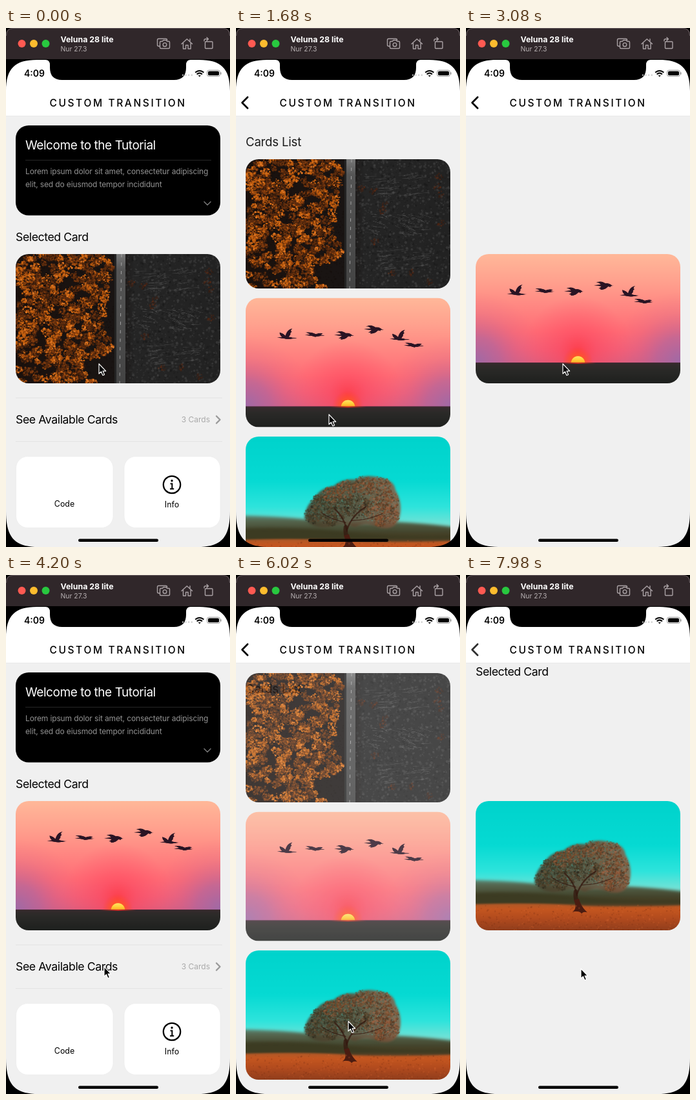
Animation, 347 px wide and 799 px high, one loop 8 s. Source, as an HTML page with a canvas:

```html
<!DOCTYPE html>
<html lang="en">
<head>
<meta charset="utf-8">
<title>Card transition</title>
<style>
  html, body { margin: 0; width: 100%; height: 100%; overflow: hidden; background: #000; }
  #stage { position: absolute; left: 0; top: 0; width: 347px; height: 799px; overflow: hidden; background: #f0f0f0; }
  #stage > * { position: absolute; left: 0; top: 0; }
  canvas { left: 15px !important; width: 317px; height: 198.5px; border-radius: 20px; }
  text { font-family: Inter, "Liberation Sans", sans-serif; }
  .h { font-size: 17.7px; letter-spacing: -.42px; }
  .line { fill: none; stroke-linecap: round; stroke-linejoin: round; }
</style>
</head>
<body>
<div id="stage">
  <svg width="347" height="799">
    <text id="listTitle" x="15" y="182" font-size="18.6" letter-spacing="-.2" fill="#1c1c1c">Cards List</text>
    <g id="top">
      <rect x="15" y="150" width="317" height="138.500" rx="20"/>
      <text x="30" y="187" font-size="19" letter-spacing="-.45" fill="#fff">Welcome to the Tutorial</text>
      <path d="M30 203.500H318" stroke="#262626"/>
      <g font-size="12" letter-spacing="-.13" fill="#929292">
        <text x="30" y="225">Lorem ipsum dolor sit amet, consectetur adipiscing</text>
        <text x="30" y="244.500">elit, sed do eiusmod tempor incididunt</text>
      </g>
      <path class="line" d="M307 267.500l5 5 5-5" stroke="#777" stroke-width="1.500"/>
      <text class="h" x="15" y="328">Selected Card</text>
    </g>
    <g id="bottom">
      <path d="M15 569.500H335M15 636.500H335" stroke="#e3e3e3"/>
      <text class="h" x="15" y="609">See Available Cards</text>
      <text x="316" y="607" font-size="12" text-anchor="end" fill="#aaa">3 Cards</text>
      <path class="line" d="M326 597.500l5.500 5.500-5.500 5.500" stroke="#999" stroke-width="2.300"/>
      <g fill="#fff" stroke="#ebebeb" stroke-width=".7">
        <rect x="15.500" y="659.500" width="150.500" height="110" rx="18"/>
        <rect x="183" y="659.500" width="149" height="110" rx="18"/>
      </g>
      <g font-size="12.400" text-anchor="middle">
        <text x="90.500" y="736.500">Code</text>
        <text x="257" y="737.500">Info</text>
      </g>
      <circle cx="257" cy="703" r="13.200" fill="none" stroke="#000" stroke-width="2.300"/>
      <circle cx="257" cy="697" r="1.700"/>
      <path d="M254.500 701.500h2.800v8M254 709.500h6.200" fill="none" stroke="#000" stroke-width="2"/>
    </g>
  </svg>

  <canvas width="634" height="397"></canvas>
  <canvas width="634" height="397"></canvas>
  <canvas width="634" height="397"></canvas>

  <svg width="347" height="799">
    <rect y="47" width="347" height="88" fill="#fff"/>
    <path d="M0 135.500H347" stroke="#e9e9e9"/>
    <text x="67.500" y="120.500" font-size="15.500" font-weight="500" letter-spacing="2.620">CUSTOM TRANSITION</text>
    <path id="back" class="line" d="M18 106.500l-8.500 8.500 8.500 8.500" stroke="#000" stroke-width="2.700"/>

    <path fill-rule="evenodd" d="M0 46H347V799H0ZM0 97C0 62 14 49 48 49H61q7 0 7 8v4q0 19 19 19H260q19 0 19-19v-4q0-8 7-8H299C333 49 347 62 347 97V744C347 784 334 799 297 799H50C13 799 0 784 0 744Z"/>
    <text x="28" y="74.500" font-size="14" font-weight="600">4:09</text>
    <path d="M273 72.500H289" stroke="#c4c4c4" stroke-width="2" stroke-dasharray="2 2.600"/>
    <g fill="none" stroke="#000" stroke-width="2">
      <path d="M293.200 68.600q6.600-5.800 13.200 0M295.600 71.200q4.200-3.600 8.400 0"/>
      <path d="M297.600 72.800h4.400l-2.200 2.400z" fill="#000" stroke="none"/>
    </g>
    <rect x="311.500" y="65" width="20" height="9.500" rx="3" fill="none" stroke="#999"/>
    <rect x="313" y="66.500" width="17" height="6.500" rx="1.800"/>
    <path d="M333 68.200v3.200" stroke="#999" stroke-width="1.400"/>
    <rect x="112" y="786.500" width="124" height="4.500" rx="2.250"/>

    <rect width="347" height="48"/>
    <path d="M0 48V10Q0 0 10 0H337Q347 0 347 10V48Z" fill="#30272a"/>
    <path d="M.5 12Q.5 .5 11 .5H336Q346.500 .5 346.500 12" fill="none" stroke="#695f62"/>
    <circle cx="24.500" cy="24" r="6" fill="#ff5a52"/>
    <circle cx="43" cy="24" r="6" fill="#fdbc2e"/>
    <circle cx="61.500" cy="24" r="6" fill="#28c83f"/>
    <text x="84.500" y="22" font-size="12.400" font-weight="700" fill="#fff">Veluna 28 lite</text>
    <text x="84.500" y="35.500" font-size="10.400" fill="#b7b0b2">Nur 27.3</text>
    <g class="line" stroke="#a9a1a4" stroke-width="1.400">
      <path d="M238 28h-1.500q-2 0-2-2v-7.500q0-2 2-2h11q2 0 2 2"/>
      <path d="M240 20.500h2.500l1.200-1.700h4.600l1.200 1.700h2.500q1.500 0 1.500 1.500v8q0 1.500-1.500 1.500h-12q-1.500 0-1.500-1.500v-8q0-1.500 1.500-1.500z"/>
      <circle cx="246" cy="25.700" r="2.800"/>
      <path d="M272 24.500l8.300-7.500 8.300 7.500M274.500 23v9h4v-5.500h3.600v5.500h4v-9M285 20v-3"/>
      <path d="M309.500 21h9.500q1 0 1 1v8.500q0 1-1 1h-9.500q-1 0-1-1v-8.500q0-1 1-1zM307 20v-1q0-2 2-2h4M311 14.500l2.500 2.500-2.500 2.500"/>
    </g>
    <path id="cursor" d="M0 0V15.200L3.400 12L5.900 17.700L8.500 16.600L6 11.100H10.700Z" stroke="#fff" stroke-width="1.200" stroke-linejoin="round"/>
  </svg>
</div>

<script>
const LOOP = 8000, DUR = 468;
const CARD_Y = [202, 415.5, 629], HOME_Y = 348;
const TOP_SHIFT = 330, BOTTOM_SHIFT = 480;

// [start, opens the list?, selected card]
const MOVES = [[640, true, 0], [2600, false, 1], [4388, true, 1], [5880, false, 2], [7741, true, 2]];
// [time, x, y] of the pointer tip
const POINTER = [[0, 144, 517], [150, 144, 517], [560, 144, 595], [1850, 144, 595], [2400, 150, 517],
  [3450, 150, 517], [4200, 152, 603], [4700, 152, 603], [5050, 152, 597], [5300, 152, 597],
  [5800, 174, 687], [6950, 174, 687], [7550, 178, 606], [8000, 178, 606]];

const $ = id => document.getElementById(id);
const cards = [...document.querySelectorAll('canvas')];
const clamp = v => Math.max(0, Math.min(1, v));
const ease = t => t < .5 ? 2 * t * t : 1 - 2 * (1 - t) ** 2;

function random(seed) {
  return () => {
    seed = seed + 0x6D2B79F5 | 0;
    let n = Math.imul(seed ^ seed >>> 15, seed | 1);
    n ^= n + Math.imul(n ^ n >>> 7, n | 61);
    return ((n ^ n >>> 14) >>> 0) / 4294967296;
  };
}

function context(i) {
  const c = cards[i].getContext('2d');
  c.scale(2, 2);
  return c;
}

function fade(c, coords, stops) {
  const g = coords.length > 4 ? c.createRadialGradient(...coords) : c.createLinearGradient(...coords);
  stops.forEach(([at, color]) => g.addColorStop(at, color));
  return g;
}

function dot(c, x, y, r, color) {
  c.fillStyle = color;
  c.beginPath();
  c.arc(x, y, r, 0, 7);
  c.fill();
}

// Scatter small dots around a point; later ones sit higher and catch more light.
function clump(c, rnd, x, y, size, count, colors) {
  for (let i = 0; i < count; i++) {
    const a = rnd() * 6.283, d = Math.sqrt(rnd()) * size;
    const shade = Math.min(colors.length - 1, Math.floor((i / count * .65 + rnd() * .4) * colors.length));
    dot(c, x + Math.cos(a) * d, y + Math.sin(a) * d * .85 - i / count * 2, .5 + rnd() * 1.3, colors[shade]);
  }
}

function drawForest() {
  const c = context(0), rnd = random(12);
  c.fillStyle = fade(c, [0, 0, 317, 0], [[0, '#1b110d'], [.5, '#191514'], [.58, '#252525'], [1, '#222']]);
  c.fillRect(0, 0, 317, 199);

  // Burnt field with tracks and a few reddish trees
  c.globalAlpha = .5;
  for (let i = 0; i < 1800; i++) {
    const v = 20 + rnd() * 55;
    dot(c, 170 + rnd() * 147, rnd() * 199, .5 + rnd() * 1.7, `rgb(${v},${v},${v})`);
  }
  c.lineWidth = .6;
  c.strokeStyle = '#858585';
  for (let i = 0; i < 120; i++) {
    const band = i % 3, x = 180 + rnd() * 85 + band * 8, y = 25 + band * 57 + rnd() * 32;
    c.globalAlpha = .12 + rnd() * .28;
    c.beginPath();
    c.moveTo(x, y);
    c.lineTo(x + 6 + rnd() * 14, y + (band === 1 ? 8 : -5) * rnd());
    c.stroke();
  }
  c.globalAlpha = .45;
  for (let i = 0; i < 12; i++) clump(c, rnd, 178 + rnd() * 125, rnd() * 195, 6, 16, ['#2b1810', '#4b2110', '#6a2f15']);

  // Road
  c.globalAlpha = 1;
  c.fillStyle = fade(c, [0, 0, 0, 199], [[0, '#777'], [.12, '#565656'], [1, '#444']]);
  c.fillRect(155, 0, 15, 199);
  c.fillStyle = '#242424';
  c.fillRect(153, 0, 3, 199);
  c.strokeStyle = '#aaa';
  c.lineWidth = .9;
  c.setLineDash([5, 8]);
  c.beginPath();
  c.moveTo(164, 0);
  c.lineTo(161, 199);
  c.stroke();

  // Autumn crowns from deep shade to lit tops
  const shade = ['#25140c', '#40200d', '#5d2c0e', '#7c390e'];
  const lit = ['#3a1d0c', '#71340d', '#a04a0e', '#c4600f', '#da7422'];
  for (let i = 0; i < 420; i++) {
    const x = rnd() * 148, y = rnd() * 199;
    if (x > 108 && y > 160 && y < 195 || x > 136 && y > 85 && y < 125) continue;
    const bright = rnd() < .48;
    clump(c, rnd, x, y, 4 + rnd() * 5, 32, bright ? lit : shade);
  }
  c.globalAlpha = .4;
  for (let i = 0; i < 1300; i++) dot(c, rnd() * 152, rnd() * 199, .4 + rnd() * 1.1, '#150d0a');
}

function drawBird(c, x, y, wing) {
  c.save();
  c.translate(x, y);
  c.fillStyle = '#2a1424';
  c.fill(new Path2D('M0 0Q8-1 13-1.500Q19-1.500 24 0L31 .8L23 1.700Q17 3.200 11 1.500Z'));
  c.fill(new Path2D(wing));
  c.restore();
}

function drawSunset() {
  const c = context(1), horizon = 166.5;
  c.fillStyle = fade(c, [0, 0, 0, horizon],
    [[0, '#ffb899'], [.25, '#ffa18e'], [.5, '#ff8581'], [.72, '#ff6c76'], [.88, '#f2617a'], [1, '#dc5f80']]);
  c.fillRect(0, 0, 317, horizon);
  for (const x of [0, 317]) {
    c.fillStyle = fade(c, [x, 164, 0, x, 164, 105],
      [[0, 'rgba(150,108,172,.85)'], [.35, 'rgba(165,104,165,.6)'], [.7, 'rgba(200,100,145,.2)'], [1, 'rgba(230,100,130,0)']]);
    c.fillRect(0, 50, 317, 117);
  }
  c.fillStyle = fade(c, [158, 150, 0, 158, 150, 85], [[0, 'rgba(255,58,70,.9)'], [.35, 'rgba(255,70,92,.55)'], [1, 'rgba(255,85,105,0)']]);
  c.fillRect(0, 60, 317, 107);
  c.fillStyle = fade(c, [158, horizon, 8, 158, horizon, 24], [[0, 'rgba(255,90,30,.9)'], [1, 'rgba(255,70,50,0)']]);
  c.fillRect(130, 140, 57, 27);
  dot(c, 158.5, horizon + 1, 10.8, fade(c, [0, 156, 0, 168], [[0, '#ffe56a'], [.55, '#ffcf38'], [1, '#ff9a22']]));
  c.fillStyle = fade(c, [0, horizon, 0, 199], [[0, '#4a2b3a'], [.06, '#342a2c'], [.3, '#2b2a28'], [1, '#1e201e']]);
  c.fillRect(0, horizon, 317, 33);
  c.fillStyle = fade(c, [130, 0, 187, 0], [[0, 'rgba(210,40,30,0)'], [.5, 'rgba(235,50,30,.85)'], [1, 'rgba(210,40,30,0)']]);
  c.fillRect(130, horizon, 57, 2);

  const up = 'M9 0Q4-3 4-8Q9-7 13-3Q16-13 24-14Q20-11 23-9Q20-7 21-5Q18-1 17 2Z';
  const flat = 'M10 1Q6-3 1-4Q10-5 17-1.500Q24-4 28-2Q22 2 16 3Z';
  const down = 'M11-1Q7-5 3-4Q11-8 18-3Q24-4 29 1Q25 .5 26 3Q22 1 21 3Q17 7 10 7Q12 5 7 5Q11 3 12 1Z';
  [[48.5, 61, up], [91.5, 57, flat], [137, 57, down], [183, 48, down], [223, 63, up], [245, 73, flat]]
    .forEach(b => drawBird(c, ...b));
}

function drawTree() {
  const c = context(2), rnd = random(5);
  c.fillStyle = fade(c, [0, 0, 0, 135], [[0, '#00d3cc'], [.5, '#06dad3'], [.8, '#2ee4dc'], [1, '#74e2d6']]);
  c.fillRect(0, 0, 317, 199);

  // Misty hills and field
  c.filter = 'blur(5px)';
  c.fillStyle = fade(c, [0, 116, 0, 165], [[0, '#5f9788'], [.3, '#53624a'], [.65, '#42422a'], [1, '#6b4425']]);
  c.fill(new Path2D('M-20 121Q60 122 110 129T230 131Q280 133 340 141V215H-20Z'));
  c.fillStyle = '#3c3b22';
  c.fill(new Path2D('M-20 142Q70 138 150 146T340 150V158H-20Z'));
  c.filter = 'blur(2.5px)';
  c.fillStyle = fade(c, [0, 155, 0, 199], [[0, '#a85a2a'], [.25, '#c4561f'], [.6, '#b04a1e'], [1, '#8f3d1c']]);
  c.fill(new Path2D('M-9 159Q90 155 170 161Q240 163 326 160V210H-9Z'));

  // Soft crown with a warm right side
  c.filter = 'blur(3px)';
  c.globalAlpha = .85;
  c.fillStyle = fade(c, [90, 130, 240, 80], [[0, '#44402c'], [.5, '#5f4630'], [1, '#8f5d43']]);
  c.fill(new Path2D('M91 125Q93 105 106 96Q114 79 136 76Q150 64 170 66Q186 57 207 63Q230 66 232 82Q245 104 237 128Q229 144 208 140Q188 131 169 139Q148 132 130 139Q103 143 91 125Z'));
  c.filter = 'none';
  // Lobes of leaves: x, y, radius
  const lobes = [[105, 122, 14], [116, 103, 16], [135, 90, 16], [156, 83, 17], [182, 76, 17], [207, 79, 19],
    [219, 100, 18], [224, 122, 15], [199, 110, 20], [174, 108, 21], [146, 110, 20], [130, 127, 13], [208, 131, 10]];
  const dark = ['#23221a', '#302c1f', '#413722', '#54412a', '#6b5138'];
  const warm = ['#352a20', '#523822', '#6d4328', '#87522f', '#a76646'];
  c.globalAlpha = .45;
  for (const [x, y, r] of lobes) clump(c, rnd, x, y, r, r * 13, x > 176 || y < 95 ? warm : dark);
  c.globalAlpha = .35;
  for (let i = 0; i < 70; i++) dot(c, 115 + rnd() * 100, 88 + rnd() * 42, .5 + rnd() * .8, '#4fa596');

  // Trunk and branches
  c.globalAlpha = .75;
  c.strokeStyle = '#34190f';
  c.lineCap = 'round';
  [[6.5, 'M163 166Q153 153 155 139'], [2.4, 'M157 145Q153 125 138 111'], [2.4, 'M157 143Q164 121 186 108'],
    [1.2, 'M155 132Q129 126 118 117'], [1.2, 'M163 129Q192 128 212 118']]
    .forEach(([w, d]) => { c.lineWidth = w; c.stroke(new Path2D(d)); });
  c.globalAlpha = 1;
  c.fillStyle = '#4a1c11';
  c.fill(new Path2D('M152 152Q158 165 150 170Q161 168 164 173Q167 169 173 171Q163 162 160 150Z'));
  c.globalAlpha = .22;
  for (let i = 0; i < 450; i++) dot(c, rnd() * 317, 160 + rnd() * 39, .5 + rnd(), rnd() < .5 ? '#6d2b14' : '#dc6a31');
}

// home and list both run 0..1; one leaves before the other arrives.
function stateAt(t) {
  let s = { home: 1, list: 0, card: 0 };
  for (const [start, opens, card] of MOVES) {
    if (t < start) break;
    const first = ease(clamp((t - start) / DUR)), second = ease(clamp((t - start - DUR) / DUR));
    s = opens ? { home: 1 - first, list: second, card } : { home: second, list: 1 - first, card };
  }
  return s;
}

function pointerAt(t) {
  const i = Math.max(1, POINTER.findIndex(p => p[0] > t));
  const [t0, x0, y0] = POINTER[i - 1], [t1, x1, y1] = POINTER[i];
  const k = ease(clamp((t - t0) / (t1 - t0)));
  return [x0 + (x1 - x0) * k, y0 + (y1 - y0) * k];
}

function render(t) {
  const { home, list, card } = stateAt(t);
  const shift = (1 - list) * (HOME_Y - CARD_Y[card]);
  cards.forEach((el, i) => {
    el.style.transform = `translateY(${CARD_Y[i] + shift}px)`;
    el.style.opacity = i === card ? 1 : list;
  });
  $('listTitle').setAttribute('opacity', list);
  $('top').setAttribute('transform', `translate(0 ${-(1 - home) * TOP_SHIFT})`);
  $('bottom').setAttribute('transform', `translate(0 ${(1 - home) * BOTTOM_SHIFT})`);
  $('back').setAttribute('opacity', clamp((1 - home) * 1.55));
  $('cursor').setAttribute('transform', `translate(${pointerAt(t)})`);
}

drawForest();
drawSunset();
drawTree();
const began = performance.now();
function tick() {
  render((performance.now() - began) % LOOP);
  requestAnimationFrame(tick);
}
tick();
</script>
</body>
</html>
```
